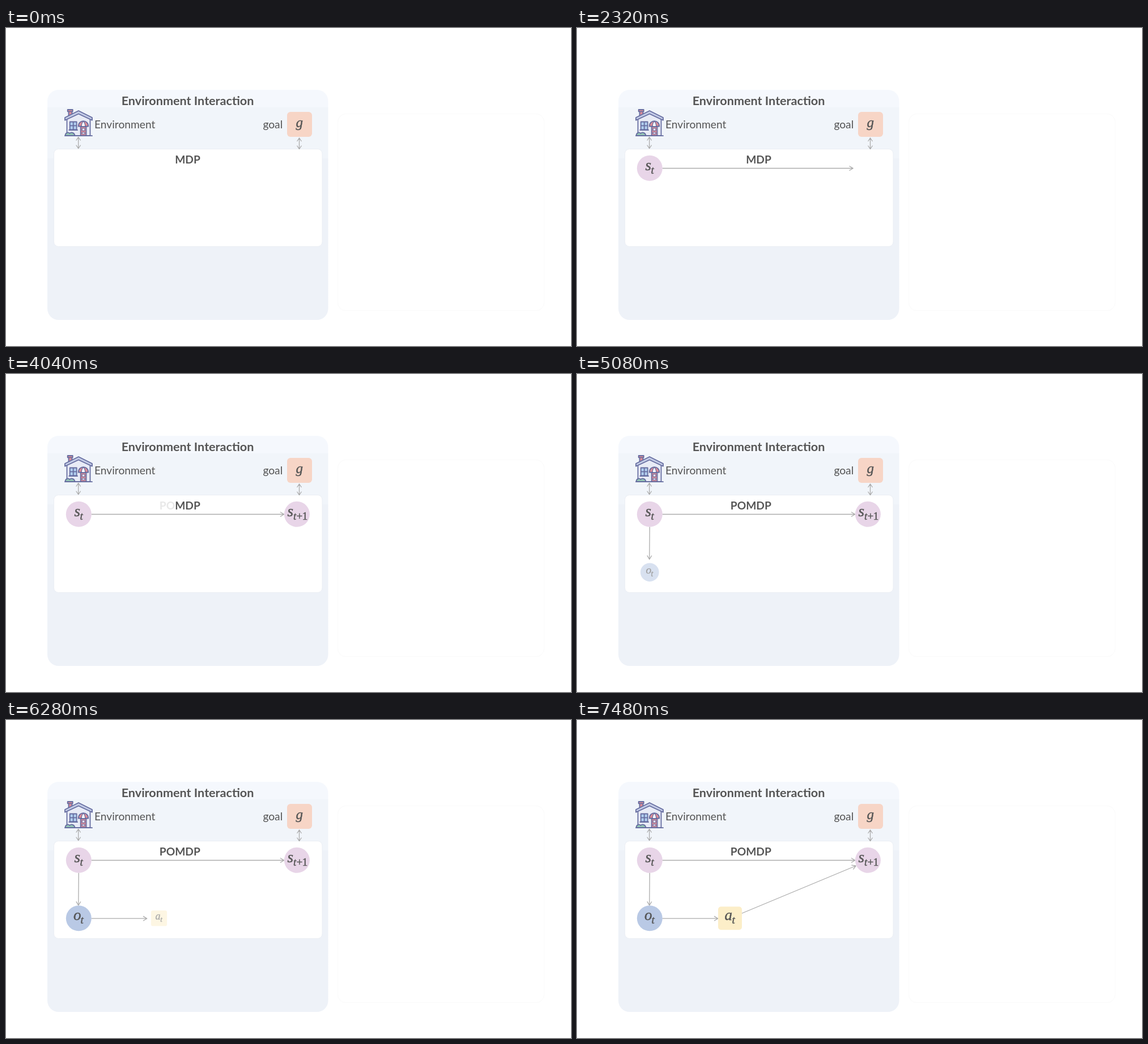
Animation of 997x561 px, one loop 8000 ms. Source, as an HTML page:

```html
<!DOCTYPE html>
<html lang="en">
<head>
<meta charset="utf-8">
<title>Environment Interaction</title>
<style>
  html, body { margin: 0; width: 100%; height: 100%; overflow: hidden; background: #fff; }
  svg { display: block; width: 100vw; height: 100vh; }
  text { fill: #555; font: 19.2px Lato, "Open Sans", sans-serif; }
  .bold { font-weight: 700; }
  .title { font-size: 21.6px; font-weight: 700; }
  .math { font: italic 27px "Liberation Serif", "Noto Serif", serif; stroke: #555; stroke-width: .45; }
  .goal { font-size: 25px; }
  .sub { font-size: 19px; }
  .upright { font-style: normal; }
  .arrow { fill: none; stroke: #ababab; stroke-width: 1.3; stroke-linecap: round; stroke-linejoin: round; }
  .house { stroke: #666da0; stroke-width: 1.8; stroke-linejoin: round; stroke-linecap: round; }
</style>
</head>
<body>
<svg viewBox="0 0 997 561" xmlns="http://www.w3.org/2000/svg">
  <defs>
    <linearGradient id="panel" gradientUnits="userSpaceOnUse" x1="0" y1="109" x2="0" y2="515">
      <stop offset=".0764" stop-color="#f5f8fd"/>
      <stop offset=".0764" stop-color="#f1f5fa"/>
      <stop offset=".298" stop-color="#f1f5fa"/>
      <stop offset=".298" stop-color="#eef2f8"/>
    </linearGradient>
  </defs>

  <rect x="585.5" y="151.5" width="364" height="347" rx="14" fill="#fff" stroke="#fafafa"/>
  <rect x="73" y="109" width="495.5" height="406" rx="20" fill="url(#panel)"/>
  <rect x="84.5" y="213.5" width="473.5" height="172" rx="8" fill="#fff" stroke="#eaeef4"/>

  <text class="title" x="320.5" y="135.5" text-anchor="middle">Environment Interaction</text>
  <text x="156" y="176.500">Environment</text>
  <text x="488.200" y="176.500" text-anchor="end">goal</text>
  <text class="bold" x="342.800" y="238.800" text-anchor="end"><tspan id="prefix">PO</tspan>MDP</text>

  <rect x="496" y="148" width="44" height="44" rx="6" fill="#f7d5c6"/>
  <text class="math goal" x="517.800" y="174.500" text-anchor="middle">g</text>

  <g class="house">
    <path d="M110.500 147h6v10h-6z" fill="#dc8d98"/>
    <path d="M108.700 144h9v3.300h-9z" fill="#dc8d98"/>
    <path d="M107.500 159L128 148.500L148.500 159V190H107.500z" fill="#e8ebf6"/>
    <path d="M104 158L128 146L152 158V162.700L128 151.500L104 162.700z" fill="#c3cbe6"/>
    <path d="M112.700 165.500h12v14h-12zM118.700 165.500v14M112.700 172.300h12" fill="#b0cdee"/>
    <path d="M111.300 180h14.800" fill="none"/>
    <path d="M131.700 174h9.800v16h-9.800z" fill="#dc8d98"/>
    <path d="M134.200 177h4.800v4h-4.800zM134.200 184h4.800v3h-4.800z" fill="#f2e9f1" stroke-width="1.200"/>
    <path d="M127.700 173.500C128 161 145 161 145.300 173.500z" fill="#dc8d98"/>
    <path d="M133.300 173.500Q133.500 167 136.500 164.500Q139.500 167 139.700 173.500z" fill="#fff" stroke-width="1.200"/>
    <path d="M104.500 190C104.500 184.500 110 183 112.300 186C115.500 182.500 121 185 121.500 190z" fill="#93c4b4"/>
    <path d="M104 190.200H152" fill="none"/>
  </g>

  <g class="arrow">
    <path d="M127.700 192.500V212.500M124 198L127.700 192.500L131.400 198M124 207L127.700 212.500L131.400 207"/>
    <path d="M517.500 194V213.500M513.800 199.500L517.500 194L521.200 199.500M513.800 208L517.500 213.500L521.200 208"/>
  </g>

  <path class="arrow" id="toNext"/>
  <path class="arrow" id="toObs"/>
  <path class="arrow" id="toAct"/>
  <path class="arrow" id="actNext"/>

  <g id="state">
    <circle r="22.500" fill="#e8d5e8"/>
    <text class="math" x="-7.700" y="4">s<tspan class="sub" x="2.300" y="9.500">t</tspan></text>
  </g>
  <g id="next">
    <circle r="22.500" fill="#e8d5e8"/>
    <text class="math" x="-17" y="4">s<tspan class="sub" x="-6.500" y="9.500">t</tspan><tspan class="sub upright" x="-1">+</tspan><tspan class="sub upright" x="9.300">1</tspan></text>
  </g>
  <g id="obs">
    <circle r="22.500" fill="#b9c9e5"/>
    <text class="math" x="-9.300" y="3.500">o<tspan class="sub" x="3.200" y="9.300">t</tspan></text>
  </g>
  <g id="act">
    <rect x="-21" y="-20.500" width="42" height="41" rx="5" fill="#fceec8"/>
    <text class="math" x="-9.500" y="3.500">a<tspan class="sub" x="3.500" y="9.300">t</tspan></text>
  </g>
</svg>

<script>
const LOOP = 8000;
const POP = 440;
const byId = id => document.getElementById(id);

const nodes = [
  { id: 'state', x: 128.3, y: 247.3, start: 1000 },
  { id: 'next', x: 513.4, y: 247.3, start: 2420 },
  { id: 'obs', x: 128.3, y: 349.8, start: 4840 },
  { id: 'act', x: 270, y: 349.8, start: 6060 }
];
const arrows = [
  { id: 'toNext', from: [151, 247.5], to: [490.7, 247.5], start: 1430, span: 960 },
  { id: 'toObs', from: [128.3, 270], to: [127.8, 327], start: 4210, span: 600 },
  { id: 'toAct', from: [151, 350.2], to: [248.7, 350.2], start: 5260, span: 800 },
  { id: 'actNext', from: [291, 341], to: [492.2, 257.2], start: 6500, span: 1000 }
];
for (const part of [...nodes, ...arrows]) part.el = byId(part.id);

const progress = (t, start, span) => Math.min(1, Math.max(0, (t - start) / span));
const easeInOut = u => u < .5 ? 2 * u * u : 1 - 2 * (1 - u) ** 2;
const popEase = u => { const v = u ** .7; return v * v * (3 - 2 * v); };

function drawNode({ el, x, y, start }, t) {
  const u = progress(t, start, POP);
  el.setAttribute('transform', `translate(${x} ${y}) scale(${popEase(u)})`);
  el.setAttribute('opacity', u);
}

function drawArrow({ el, from: [x0, y0], to: [x1, y1], start, span }, t) {
  const k = easeInOut(progress(t, start, span));
  const length = Math.hypot(x1 - x0, y1 - y0);
  const dx = (x1 - x0) / length, dy = (y1 - y0) / length;
  const x = x0 + (x1 - x0) * k, y = y0 + (y1 - y0) * k;
  const back = Math.min(6.3, length * k), side = back * .6;
  const barb = s => `${x - dx * back - dy * side * s} ${y - dy * back + dx * side * s}`;
  el.setAttribute('d', k ? `M${x0} ${y0}L${x} ${y}M${barb(1)}L${x} ${y}L${barb(-1)}` : '');
}

function render(now) {
  const t = now % LOOP;
  for (const node of nodes) drawNode(node, t);
  for (const arrow of arrows) drawArrow(arrow, t);
  byId('prefix').style.fillOpacity = progress(t, 4000, 300);
  requestAnimationFrame(render);
}
render(0);
</script>
</body>
</html>
```
